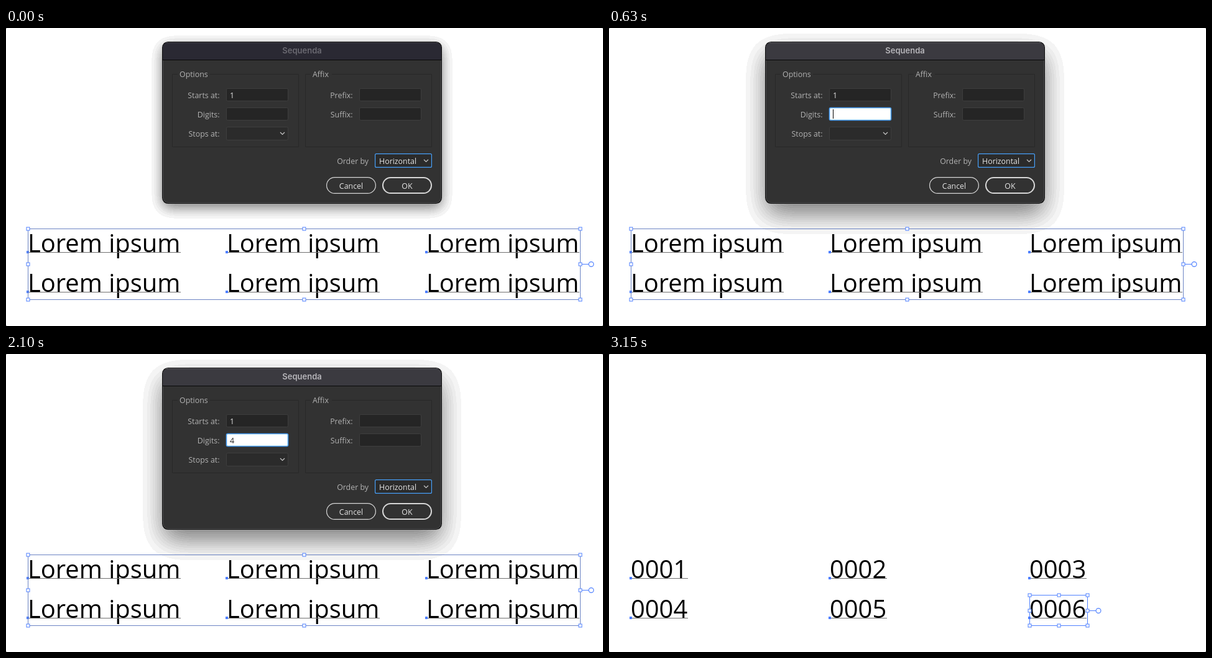
Recreate the animation shown at these times as an HTML page. Size 960 px wide and 480 px high, loop 5.46 s.

```html
<!DOCTYPE html>
<html lang="en">
<head>
<meta charset="utf-8">
<title>Numbering dialog</title>
<style>
  html, body { margin: 0; width: 100%; height: 100%; overflow: hidden; background: #777; }
  svg { display: block; width: 100%; height: 100%; }
  text { font: 12.4px "Open Sans", "Noto Sans", sans-serif; fill: #b2b2b2; }
  .art { font-size: 39.9px; fill: #000; }
  .title { font: 600 13px Inter, Roboto, sans-serif; }
  .bright { font-weight: 500; fill: #e4e4e4; }
</style>
</head>
<body>
<svg id="stage" viewBox="0 0 960 480"></svg>
<script>
const LOOP = 5460;
const BLUE = '#4f80ff', FOCUS = '#479ff8';
const COLUMNS = [35, 355, 676], BASELINES = [361, 425];
const stage = document.getElementById('stage');

const rect = (x, y, w, h, fill, extra = '') =>
  `<rect x="${x}" y="${y}" width="${w}" height="${h}" fill="${fill}" ${extra}/>`;
const line = (d, color, width = 1) =>
  `<path d="${d}" fill="none" stroke="${color}" stroke-width="${width}"/>`;
const text = (x, y, content, extra = '') => `<text x="${x}" y="${y}" ${extra}>${content}</text>`;
const label = (x, y, content) => text(x, y, content, 'text-anchor="end"');

// Transform box with eight handles and the widget on its right side.
function selection(x, y, w, h, color) {
  const right = x + w, midX = Math.floor(x + w / 2) + .5, midY = Math.floor(y + h / 2) + .5;
  const handles = [x, midX, right].flatMap(hx => [y, midY, y + h].map(hy => [hx, hy]))
    .filter(([hx, hy]) => hx !== midX || hy !== midY)
    .map(([hx, hy]) => rect(hx - 2.5, hy - 2.5, 5, 5, '#fff', `stroke="${BLUE}"`));
  return rect(x, y, w, h, 'none', `stroke="${color}"`)
    + line(`M${right} ${midY}h14`, BLUE) + handles.join('')
    + `<circle cx="${right + 17.5}" cy="${midY}" r="3.9" fill="#fff" stroke="${BLUE}" stroke-width="1.2"/>`;
}

function artwork(numbered) {
  const width = numbered ? 91 : 245;
  const items = BASELINES.flatMap((y, row) => COLUMNS.map((x, col) =>
    text(x, y, numbered ? String(row * 3 + col + 1).padStart(4, '0') : 'Lorem ipsum', 'class="art"')
    + line(`M${x + 1} ${y + .5}h${width}`, '#707070')
    + rect(x - 2, y - 2, 4, 4, BLUE)));
  return items.join('') + (numbered
    ? selection(676.5, 388.5, 93, 49, BLUE)
    : selection(35.5, 323.5, 888, 114, '#6c84c4'));
}

// Stepped alpha gives the shadow its faint contour bands and its clear outer edge.
function shadow(active) {
  const steps = Array.from({ length: 33 }, (_, i) => i ? (i + .5) / 33 : 0).join(' ');
  const blur = active ? 21 : 11;
  return `<filter id="soft" filterUnits="userSpaceOnUse" x="120" y="-90" width="720" height="500"
      color-interpolation-filters="sRGB"><feGaussianBlur stdDeviation="${blur}"/>
      <feComponentTransfer><feFuncA type="discrete" tableValues="${steps}"/></feComponentTransfer></filter>`
    + rect(251, active ? 40 : 29, 450, 261, '#000', 'rx="9" opacity="1" fill-opacity=".52" filter="url(#soft)"');
}

function field(x, y, value = '', { focused, selected, caret } = {}) {
  const box = focused
    ? rect(x + .5, y + .5, 99, 20, '#fff', `rx="2" stroke="${FOCUS}" stroke-width="1.6"`)
    : rect(x + .5, y + .5, 99, 20, '#252525', 'rx="2" stroke="#3e3e3e"');
  const color = focused && !selected ? '#222' : '#dedede';
  return box
    + (selected ? rect(x + 6, y + 3, 8, 15, '#3d6494') : '')
    + text(x + 6, y + 16, value, `style="fill:${color}"`)
    + (caret ? rect(x + (value ? 13 : 6), y + 3, 1, 15, '#000') : '');
}

const chevron = (x, y) => line(`M${x} ${y}l3.5 3.5l3.5 -3.5`, '#c8c8c8', 1.2);

function group(x, name, gap) {
  return line(`M${x + 9} 74.5H${x + .5}V191.5H${x + 203.5}V74.5H${x + gap}`, '#282828')
    + text(x + 12, 79, name);
}

function button(x, name, fill, border, width) {
  const inset = width / 2;
  return rect(x + inset, 240 + inset, 80 - width, 27 - width, fill,
      `rx="${(27 - width) / 2}" stroke="${border}" stroke-width="${width}"`)
    + text(x + 40, 259, name, 'class="bright" text-anchor="middle"');
}

function dialog(t) {
  const active = t >= 420;
  const startFocused = t >= 420 && t < 630;
  const digitsFocused = t >= 630 && t < 3080;
  const caret = digitsFocused && (t < 1260 || (t >= 1540 && t < 2100) || t >= 2660);
  const pressed = t >= 2870;
  return shadow(active)
    + rect(251, 22, 450, 261, '#0b0b0b', 'rx="9.5"')
    + rect(252.5, 23.5, 447, 258, '#323232', 'rx="8.5" stroke="#4c4c4e"')
    + `<path d="M252 51V32a9 9 0 0 1 9 -9H691a9 9 0 0 1 9 9V51Z" fill="${active ? '#3b3a40' : '#2a2933'}"/>`
    + line('M258 23.5H694', active ? '#5d5c62' : '#45444c')
    + line('M252 51.5H700', '#080808')
    + text(476, 41, 'Sequenda', `class="title" text-anchor="middle" style="fill:${active ? '#b6b5b9' : '#6a6971'}"`)
    + group(267, 'Options', 61) + group(481, 'Affix', 43)
    + label(343.5, 113, 'Starts at:') + label(343.5, 144, 'Digits:') + label(343.5, 175, 'Stops at:')
    + label(557.5, 113, 'Prefix:') + label(557.5, 144, 'Suffix:') + label(583, 219, 'Order by')
    + field(354, 97, '1', { focused: startFocused, selected: startFocused })
    + field(354, 128, t >= 1540 ? '4' : '', { focused: digitsFocused, caret })
    + field(568, 97) + field(568, 128)
    + rect(354.5, 159.5, 99, 21, '#2b2b2b', 'rx="2" stroke="#3e3e3e"') + chevron(441, 168)
    + rect(593.6, 202.6, 90.8, 21.8, '#2b2b2b', `rx="2" stroke="${FOCUS}" stroke-width="1.2"`)
    + text(600, 219, 'Horizontal', 'class="bright"') + chevron(672, 212)
    + button(515, 'Cancel', 'none', '#d6d6d6', 1.2)
    + button(605, 'OK', pressed ? FOCUS : 'none', pressed ? FOCUS : '#d6d6d6', 2);
}

function scene(t) {
  const numbered = t >= 3150;
  return rect(0, 0, 960, 480, '#fff', 'rx="2"') + (numbered ? '' : dialog(t)) + artwork(numbered);
}

let shown = '';
function frame() {
  const markup = scene(performance.now() % LOOP);
  if (markup !== shown) stage.innerHTML = shown = markup;
  requestAnimationFrame(frame);
}
frame();
</script>
</body>
</html>
```
